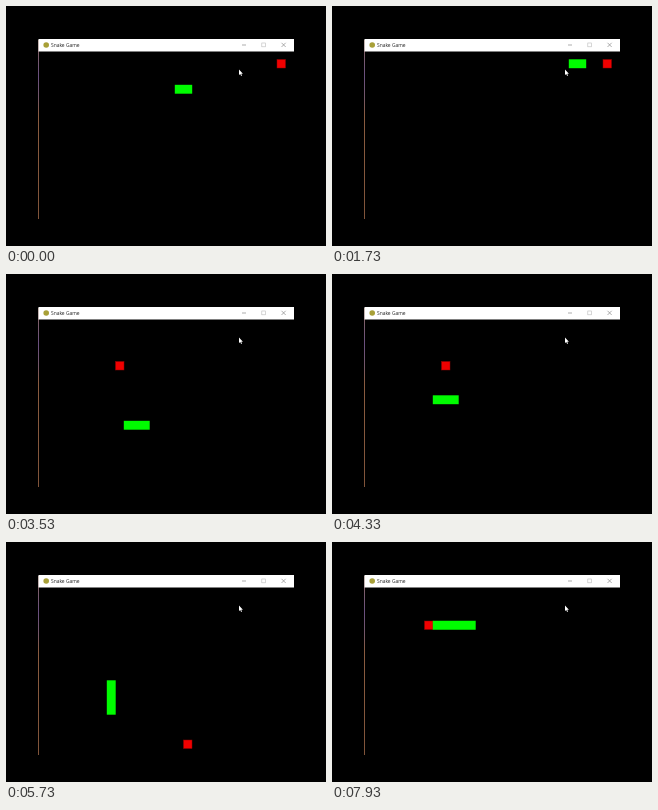
Recreate the animation shown at these times as an HTML page. Size 320 px wide and 240 px high, loop 8000 ms.

```html
<!DOCTYPE html>
<html lang="en">
<head>
<meta charset="utf-8">
<title>Snake Game</title>
<style>
  html, body { margin: 0; width: 100%; height: 100%; overflow: hidden; background: #000; }
  svg { display: block; width: 100vw; height: 100vh; }
  text { font: 4.9px "Open Sans", "Noto Sans", sans-serif; fill: #222; }
</style>
</head>
<body>
<svg viewBox="0 0 320 240">
  <defs>
    <linearGradient id="edge" x1="0" y1="0" x2="0" y2="1">
      <stop offset="0" stop-color="#8a6a5c"/>
      <stop offset=".2" stop-color="#6a5080"/>
      <stop offset=".32" stop-color="#74586a"/>
      <stop offset=".42" stop-color="#8a5c40"/>
      <stop offset="1" stop-color="#80543a"/>
    </linearGradient>
  </defs>
  <rect width="320" height="240"/>
  <rect x="32" y="34" width="1" height="179" fill="url(#edge)"/>
  <rect x="32.5" y="33" width="255.5" height="12.5" fill="#fff"/>
  <circle cx="40.2" cy="39" r="2.8" fill="#a8a038"/>
  <text x="45" y="40.8">Snake Game</text>
  <g fill="none" stroke="#777" stroke-width=".6">
    <path d="M236 39h4M275.5 36.8l4.2 4.2m0-4.2l-4.2 4.2"/>
    <rect x="255.8" y="37" width="3.8" height="3.8" stroke="#bbb"/>
  </g>
  <rect id="food" width="8.5" height="8.5" fill="#f00000" stroke="#900000" stroke-width=".5"/>
  <path id="snake" fill="none" stroke="#00fc00" stroke-width="8.9" stroke-linecap="square"/>
  <path d="M233 63.5v5.6l1.3-1.1.8 1.9.9-.4-.8-1.8h1.7z" fill="#fff"/>
</svg>
<script>
  const LOOP = 8000, FPS = 15, MOVES_PER_SECOND = 17.3, PHASE = 0.96;
  const CELL = 8.5, LEFT = 33, TOP = 45;
  const DIRECTIONS = { L: [-1, 0], R: [1, 0], U: [0, -1], D: [0, 1] };
  const ROUTE = 'L9 U3 R21 D11 L23 U3 R10 U4 L7 D13 R10 U14 L12';
  const FOODS = [[28, 1], [9, 5], [17, 18], [7, 4]];

  const trail = [[17, 4], [16, 4]];
  for (const leg of ROUTE.split(' ')) {
    const [dx, dy] = DIRECTIONS[leg[0]];
    for (let i = 0; i < +leg.slice(1); i++) {
      const [x, y] = trail[trail.length - 1];
      trail.push([x + dx, y + dy]);
    }
  }

  // Trail index at which each piece of food is eaten
  let from = 0;
  const meals = FOODS.map(([x, y]) =>
    from = trail.findIndex((p, i) => i > from && p[0] === x && p[1] === y));

  const food = document.getElementById('food');
  const snake = document.getElementById('snake');
  const center = ([x, y]) => `${LEFT + (x + .5) * CELL} ${TOP + (y + .5) * CELL}`;

  function draw(ms) {
    const seconds = Math.floor((ms + 4) * FPS / 1000) / FPS;
    const head = 1 + Math.floor(seconds * MOVES_PER_SECOND + PHASE);
    const eaten = meals.filter(i => i <= head).length;
    const body = trail.slice(Math.max(0, head - 1 - eaten), head + 1);
    snake.setAttribute('d', 'M' + body.map(center).join('L'));
    const [x, y] = FOODS[Math.min(eaten, FOODS.length - 1)];
    food.setAttribute('x', LEFT + x * CELL);
    food.setAttribute('y', TOP + y * CELL);
  }

  const start = performance.now();
  function tick(now) {
    draw(Math.max(0, now - start) % LOOP);
    requestAnimationFrame(tick);
  }
  draw(0);
  requestAnimationFrame(tick);
</script>
</body>
</html>
```
